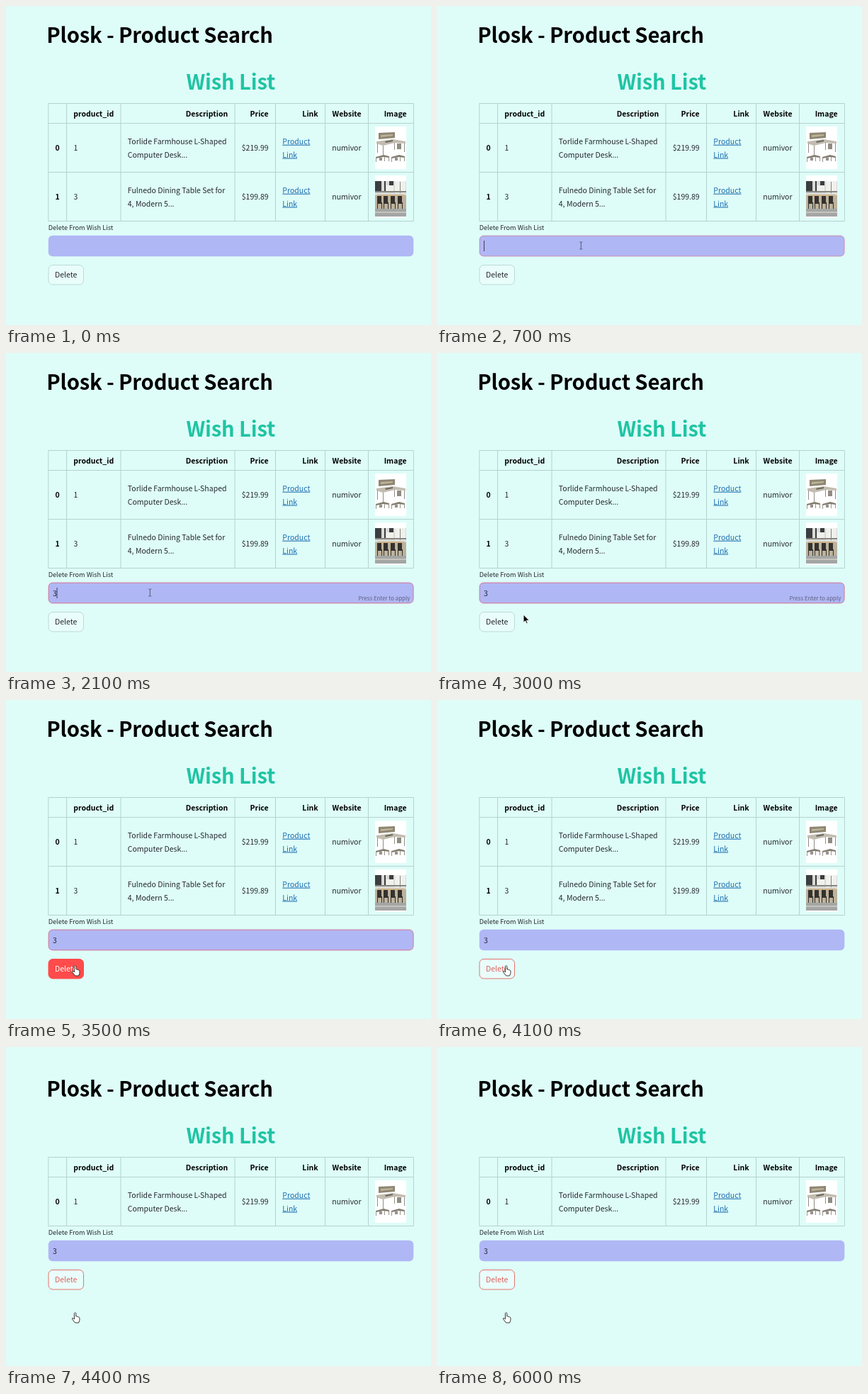
An HTML page that plays this animation: 600 px wide and 450 px high, repeating every 6200 ms.

```html
<!DOCTYPE html>
<html lang="en">
<head>
<meta charset="utf-8">
<title>Wish List</title>
<style>
  html, body { margin: 0; width: 100%; height: 100%; overflow: hidden; background: #defdf8; }
  svg { display: block; font: 10.51px "Noto Sans CJK JP", "Noto Sans CJK SC", "Noto Sans CJK", sans-serif; fill: #262730; }
  .title { font-size: 29.2px; font-weight: 700; letter-spacing: -.005em; fill: #000; }
  .head { font-weight: 700; fill: #000; }
  .link { fill: #1f6fb2; text-decoration: underline; }
  .grid { fill: none; stroke: #b4d3cf; }
  .end { text-anchor: end; }
  .mid { text-anchor: middle; }
</style>
</head>
<body>
<svg width="600" height="450" viewBox="0 0 600 450">
  <g id="table">
    <text class="title end" x="376.9" y="52.3">Plosk - Product Search</text>
    <text class="title mid" x="317.3" y="117.5" style="fill:#1fc4a4">Wish List</text>
    <g id="rows"></g>
  </g>
  <g id="form">
    <text x="59.7" y="316" style="font-size:9.2px">Delete From Wish List</text>
    <rect x="59.8" y="323.8" width="515.5" height="29.4" rx="6" fill="#b0b7f5"/>
    <rect id="focus" x="60.2" y="324.2" width="514.8" height="28.6" rx="5.5" fill="none" stroke="#dc7a92"/>
    <text id="value" x="66" y="342.7">3</text>
    <path id="caret" stroke="#3b3d55"/>
    <text id="hint" class="end" x="570.3" y="349.3" style="font-size:7.88px" fill-opacity=".6">Press Enter to apply</text>
    <rect id="button" x="60" y="365.5" width="49.5" height="27.5" rx="6"/>
    <text id="label" class="mid" x="84.6" y="383.2">Delete</text>
  </g>
  <path id="mouse" stroke-linejoin="round"/>
</svg>
<script>
const $ = id => document.getElementById(id);
const set = (id, attrs) => { for (const k in attrs) $(id).setAttribute(k, attrs[k]); };
const text = (x, y, str, cls = '') => `<text x="${x}" y="${y}" class="${cls}">${str}</text>`;
const shape = (d, fill) => `<path d="${d}" fill="${fill}"/>`;

const edges = [59.8, 85.6, 162, 323, 380.5, 450.5, 511.5, 575.4];
const grid = (top, bottom) =>
  `<path class="grid" d="${edges.map(x => `M${x} ${top}V${bottom}`).join('')}M59.8 ${top}H575.4M59.8 ${bottom}H575.4"/>`;

// Product pictures, 44 x 60
const desk = shape('M0 0H44V60H0Z', '#fff') +
  shape('M5 9L28 8V16L5 18Z', '#8f8672') + shape('M8 12L25 11V13L8 15Z', '#bdb39c') +
  shape('M2 21L25 18 43 21V24L28 23 11 27 2 24Z', '#c2bcb0') +
  shape('M3 24H4V37H3ZM11 27H12V40H11ZM27 23H28V33H27ZM41 24H42V36H41ZM31 24H37V32H31Z', '#908c84') +
  shape('M14 21L25 19V21L15 23Z', '#6a665e') +
  [1, 23].map(x => shape(`M${x} 43l11 -3 8 2v2l-8 -1 -11 2Z`, '#837c70') +
    shape(`M${x} 45h1v5h-1ZM${x + 5} 44h4v4h-4ZM${x + 12} 43h1v6h-1ZM${x + 18} 44h1v5h-1Z`, '#97928a')).join('');
const kitchen = shape('M0 0H44V60H0Z', '#fff') +
  shape('M0 8H44V28H0Z', '#d9dad6') + shape('M0 28H44V47H0Z', '#bdb29c') + shape('M0 47H44V58H0Z', '#a3a6a5') +
  shape('M0 8H9V22H0ZM13 8H15V24H13ZM20 8H26V14H20Z', '#3b3d3f') +
  shape('M28 8H43V25H28ZM16 14H26V22H16Z', '#f0f0ed') + shape('M35 9H36V25H35ZM0 22H44V24H0Z', '#86857f') +
  shape('M3 27H41V30H3Z', '#cdb48c') +
  [3, 12, 22, 32].map(x => shape(`M${x} 29h6v9h1v9h-1v-7h-5v7h-1Z`, '#34322f')).join('') +
  shape('M0 51H44V53H0Z', '#c6c4bd');

function row(index, id, lines, price, picture) {
  const top = 165.5 + 69 * index, mid = top + 38.6;
  const pair = (x, strs, cls) => strs.map((s, i) => text(x, mid - 9.4 + 18.8 * i, s, cls)).join('');
  return `<g id="row${index}">` + grid(top, top + 69) +
    text(69.5, mid, index, 'head') + text(95.5, mid, id) + pair(171.8, lines) +
    text(332.8, mid, price) + pair(390.3, ['Product', 'Link'], 'link') + text(460.3, mid, 'numivor') +
    `<g transform="translate(521 ${top + 4.5})">${picture}</g></g>`;
}

const heads = ['product_id', 'Description', 'Price', 'Link', 'Website', 'Image'];
$('rows').innerHTML = grid(137.5, 165.5) +
  heads.map((h, i) => text(edges[i + 2] - 9.8, 156, h, 'head end')).join('') +
  row(0, 1, ['Torlide Farmhouse L-Shaped', 'Computer Desk...'], '$219.99', desk) +
  row(1, 3, ['Fulnedo Dining Table Set for', '4, Modern 5...'], '$199.89', kitchen);

const cursors = {
  beam: { d: 'M-2 -5H-.5L0 -4.5 .5 -5H2M0 -4.5V4.5M-2 5H-.5L0 4.5 .5 5H2', fill: 'none', stroke: '#4b4d66', 'stroke-width': .9 },
  arrow: { d: 'M0 0V11L2.6 8.6 4.4 12.5 6 11.8 4.3 8H8Z', fill: '#000', stroke: '#fff', 'stroke-width': .8 },
  hand: { d: 'M-1.2 1Q0 -.8 1.2 1V5.5Q2.5 4.6 3.2 6 4.5 5.3 5 6.7 6.4 6.5 6.3 8V11L5 14.5H0L-4 9.5Q-4.5 7.5 -2.8 7.9L-1.2 9.5Z', fill: '#fff', stroke: '#222', 'stroke-width': .9 }
};
const clamp = v => Math.max(0, Math.min(1, v));

function mouseAt(t) {
  if (t >= 3300) return [97.6, 374.5];
  const p = clamp((t - 2500) / 700), e = p * p * (3 - 2 * p);
  return [203.3 - 101.3 * e, 338 + 39 * e];
}

function draw(t) {
  const deleted = t >= 4200, typed = t >= 2100;
  const [x, y] = mouseAt(t);
  const hover = x < 110 && y > 365, pressed = t >= 3500 && t < 3700;

  set('table', { transform: `translate(0 ${deleted ? 18 : 0})` });
  set('form', { transform: `translate(0 ${deleted ? -51 : 0})` });
  set('row1', { visibility: deleted ? 'hidden' : 'visible' });

  const focus = t < 3500 ? clamp((t - 500) / 300) : 1 - clamp((t - 3500) / 200);
  set('focus', { opacity: focus });
  set('value', { opacity: +typed });
  set('hint', { opacity: +(typed && t < 3500) });

  const blinkStart = typed ? 2100 : 700;
  const caretOn = t >= 600 && t < 3500 && (t < 700 || (t - blinkStart) % 1000 < 500);
  set('caret', { d: `M${typed ? 72 : 66.5} 331V346`, opacity: +caretOn });

  set('button', {
    fill: pressed ? '#ff4b4b' : '#e9fefb',
    stroke: pressed ? '#ff4b4b' : hover ? '#e8706c' : '#bcd9d6'
  });
  $('label').style.fill = pressed ? '#fff' : hover ? '#e0605e' : '';

  set('mouse', {
    ...cursors[hover ? 'hand' : y < 353 ? 'beam' : 'arrow'],
    transform: `translate(${x} ${y})`, opacity: +(t >= 600)
  });
}

function frame() {
  draw(Math.floor(performance.now() % 6200 / 100) * 100);
  requestAnimationFrame(frame);
}
frame();
</script>
</body>
</html>
```
